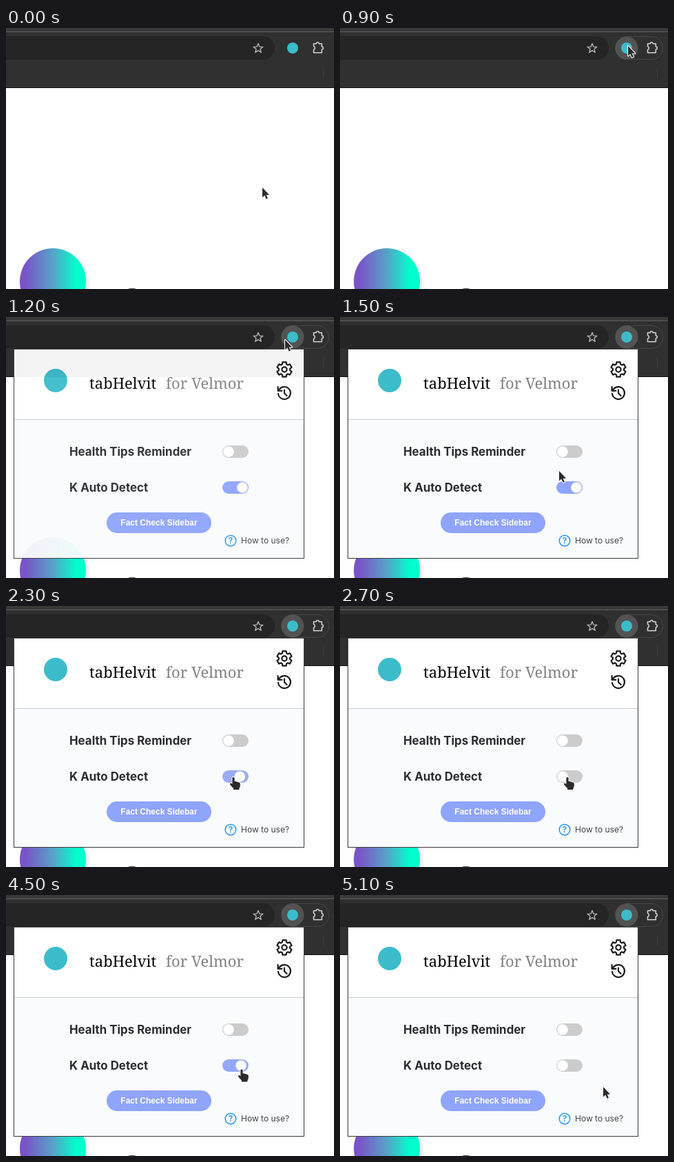
These frames come from a looping animation (476x378 px, 5.7 s). An HTML page:

```html
<!DOCTYPE html>
<html lang="en">
<head>
<meta charset="utf-8">
<title>Extension popup</title>
<style>
  html, body { margin: 0; width: 100%; height: 100%; overflow: hidden; background: #fff; }
  svg { display: block; width: 476px; height: 378px; }
  .line { fill: none; stroke-linecap: round; stroke-linejoin: round; }
  .title { font: 22px "Noto Serif", serif; }
  .label { font: 700 16.9px Inter, sans-serif; fill: #2c2c2e; }
  .hint { font: 12px Inter, sans-serif; fill: #444; }
  .button { font: 700 12px "Liberation Sans", Arial, sans-serif; fill: #fff; text-anchor: middle; }
</style>
</head>
<body>
<svg viewBox="0 0 476 378">
  <defs>
    <linearGradient id="ballFill">
      <stop offset=".08" stop-color="#7a53c8"/>
      <stop offset=".5" stop-color="#58a2c8"/>
      <stop offset=".86" stop-color="#00ffcc"/>
    </linearGradient>
    <filter id="soft" x="-30%" y="-30%" width="160%" height="160%">
      <feGaussianBlur stdDeviation="3"/>
    </filter>
  </defs>

  <!-- Page -->
  <rect width="476" height="378" fill="#fff"/>
  <circle cx="71" cy="370" r="48" fill="#000" opacity=".12" filter="url(#soft)"/>
  <circle cx="68" cy="367" r="48" fill="url(#ballFill)"/>
  <path d="M177 378.6q6-2.2 12 0" fill="none" stroke="#555" stroke-width="1.5"/>

  <!-- Browser toolbar -->
  <rect width="476" height="87" fill="#303030"/>
  <rect width="476" height="5" fill="#393939"/>
  <rect y="5" width="476" height="1" fill="#626262"/>
  <rect y="86" width="476" height="1" fill="#120d10"/>
  <rect x="-40" y="12" width="430" height="34" rx="17" fill="#252525"/>
  <rect x="460" y="58" width="1" height="15" fill="#3d3d3d"/>
  <path id="star" class="line" stroke="#b4b4b4" stroke-width="1.4"/>
  <g id="hover">
    <rect x="399.5" y="12.5" width="69" height="33" rx="16.5" fill="none" stroke="#484848"/>
    <circle cx="416" cy="29" r="16.5" fill="#535353"/>
  </g>
  <circle cx="416" cy="29" r="8" fill="#3cbccb"/>
  <path class="line" stroke="#d2d2d2" stroke-width="1.6"
        d="M446.5 22.8h3.7a2 2 0 0 1 4 0h4.1v4.2a2 2 0 0 1 0 4v4.8h-11.8v-4.2a2.6 2.6 0 0 0 0-5z"/>

  <!-- Popup -->
  <g id="popup">
    <rect x="11.5" y="46.5" width="421" height="303" fill="#fff"/>
    <rect x="12" y="148" width="420" height="201" fill="#f9fbfd"/>
    <rect x="12" y="148" width="420" height="1" fill="#c9cbcd"/>
    <rect x="11.5" y="46.5" width="421" height="303" fill="none" stroke="#3a3a3a"/>
    <circle cx="72" cy="92" r="17" fill="#3cbccb"/>
    <text class="title" x="121" y="104" font-weight="700">tabHelvit</text>
    <text class="title" x="232" y="104" fill="#808080">for Velmor</text>
    <g class="line" stroke="#1c1c1e" stroke-width="2.2">
      <path id="gear"/>
      <circle cx="404" cy="76" r="3.6"/>
      <path d="M395 111a9 9 0 1 0 2.3-7l-2.6 2.8M394.6 101.2v5.7h5.7M404 105.5v4.9l3.6 3.6"/>
    </g>
    <text class="label" x="92" y="201">Health Tips Reminder</text>
    <text class="label" x="92" y="253">K Auto Detect</text>
    <rect x="314" y="186" width="38" height="18" rx="9" fill="#ccc"/>
    <circle cx="323" cy="195" r="7.8" fill="#fff"/>
    <rect id="track" x="314" y="238" width="38" height="18" rx="9"/>
    <circle id="knob" cy="247" r="7.8" fill="#fff"/>
    <rect x="146" y="283" width="152" height="30" rx="15" fill="#8fa4fd"/>
    <text class="button" x="222" y="302">Fact Check Sidebar</text>
    <circle cx="326" cy="324" r="7.8" fill="none" stroke="#2494f0" stroke-width="1.5"/>
    <text x="326" y="328.3" text-anchor="middle" font-family="Inter, sans-serif" font-size="12"
          font-weight="600" fill="#2494f0">?</text>
    <text class="hint" x="341" y="328">How to use?</text>
  </g>

  <!-- Pointers, both with the hot spot at 0,0 -->
  <g id="pointer" fill="#2b2b2b" stroke="#fff" stroke-linejoin="round" paint-order="stroke">
    <path id="arrow" stroke-width="2" d="M0 0V14.6L3.3 11.6 5.7 16.8 8 15.8 5.7 10.7H10.2Z"/>
    <path id="hand" stroke-width="2"
          d="M-1.6 1.4Q-1.5 0 0 0T1.6 1.4V6Q3.5 5.2 4.3 6.6 6 5.9 6.9 7.4 9.6 6.8 9.8 9.2V12.5Q9.6 14.6 8.4 16V18H0V16Q-2.8 13.6-5 10.2-5.5 8.6-4 8.4-2.8 8.6-1.6 10Z"/>
  </g>
</svg>

<script>
const LOOP = 5700, STEP = 100;
const $ = id => document.getElementById(id);
const mix = (a, b, p) => a + (b - a) * p;
const clamp = p => Math.min(1, Math.max(0, p));

// Rows of [time, values...], linear between rows
function track(rows, t) {
  const next = rows.findIndex(row => row[0] > t);
  if (next < 0) return rows[rows.length - 1].slice(1);
  if (next === 0) return rows[0].slice(1);
  const a = rows[next - 1], b = rows[next];
  const p = (t - a[0]) / (b[0] - a[0]);
  return a.slice(1).map((v, i) => mix(v, b[i + 1], p));
}

// CSS "ease": cubic-bezier(.25, .1, .25, 1)
function ease(x) {
  const curve = (a, b, s) => 3 * a * s * (1 - s) ** 2 + 3 * b * s * s * (1 - s) + s ** 3;
  let lo = 0, hi = 1;
  for (let i = 0; i < 20; i++) {
    const mid = (lo + hi) / 2;
    if (curve(.25, .25, mid) < x) lo = mid; else hi = mid;
  }
  return curve(.1, 1, lo);
}

// Closed path through polar points [degrees, radius]
const polar = (cx, cy, points) => "M" + points.map(([deg, r]) => {
  const a = deg * Math.PI / 180;
  return (cx + r * Math.sin(a)).toFixed(2) + " " + (cy - r * Math.cos(a)).toFixed(2);
}).join("L") + "Z";

$("star").setAttribute("d", polar(366, 29.6,
  Array.from({ length: 10 }, (_, i) => [i * 36, i % 2 ? 3.1 : 7.2])));
$("gear").setAttribute("d", polar(404, 76,
  Array.from({ length: 6 }, (_, i) => i * 60)
    .flatMap(a => [[a - 22, 8.2], [a - 14, 11], [a + 14, 11], [a + 22, 8.2]])));

const PATH = [
  [0, 372, 231], [100, 374, 225], [200, 384, 188], [300, 399, 126], [400, 411, 68],
  [500, 417, 34], [600, 418, 26], [1100, 418, 26], [1200, 405, 33], [1300, 375, 92],
  [1400, 338, 172], [1500, 318, 223], [1600, 317, 233], [1800, 320, 241], [1900, 330, 248],
  [3700, 330, 248], [3800, 341, 252], [3900, 342, 253], [4100, 342, 253], [4200, 342, 252.5],
  [4600, 342, 252.5], [4700, 350, 259], [4800, 370, 271], [4900, 380, 277],
  [5000, 380, 277], [5100, 382, 278]
];
const FADE = [[900, 0, -3], [1000, .22, -2], [1100, .65, -1], [1200, .95, 0], [1300, 1, 0]];
const FLIPS = [[2240, 0], [3280, 1], [4460, 0]];

function switchState(t) {
  let value = 1;
  for (const [start, goal] of FLIPS) {
    if (t > start) value = mix(value, goal, ease(clamp((t - start) / 400)));
  }
  return value;
}

function render(time) {
  const t = Math.floor((time % LOOP) / STEP) * STEP;

  const [x, y] = track(PATH, t);
  const isHand = t >= 1900 && t < 4700;
  $("pointer").setAttribute("transform", `translate(${x} ${y})`);
  $("hand").style.display = isHand ? "" : "none";
  $("arrow").style.display = isHand ? "none" : "";
  $("hover").style.display = t >= 500 ? "" : "none";

  const [opacity, shift] = track(FADE, t);
  $("popup").setAttribute("opacity", opacity);
  $("popup").setAttribute("transform", `translate(0 ${shift})`);

  const on = switchState(t);
  $("knob").setAttribute("cx", mix(323, 343, on));
  $("track").setAttribute("fill",
    `rgb(${mix(204, 143, on)},${mix(204, 164, on)},${mix(204, 253, on)})`);
}

const origin = performance.now();
function tick() {
  render(performance.now() - origin);
  requestAnimationFrame(tick);
}
tick();
</script>
</body>
</html>
```
